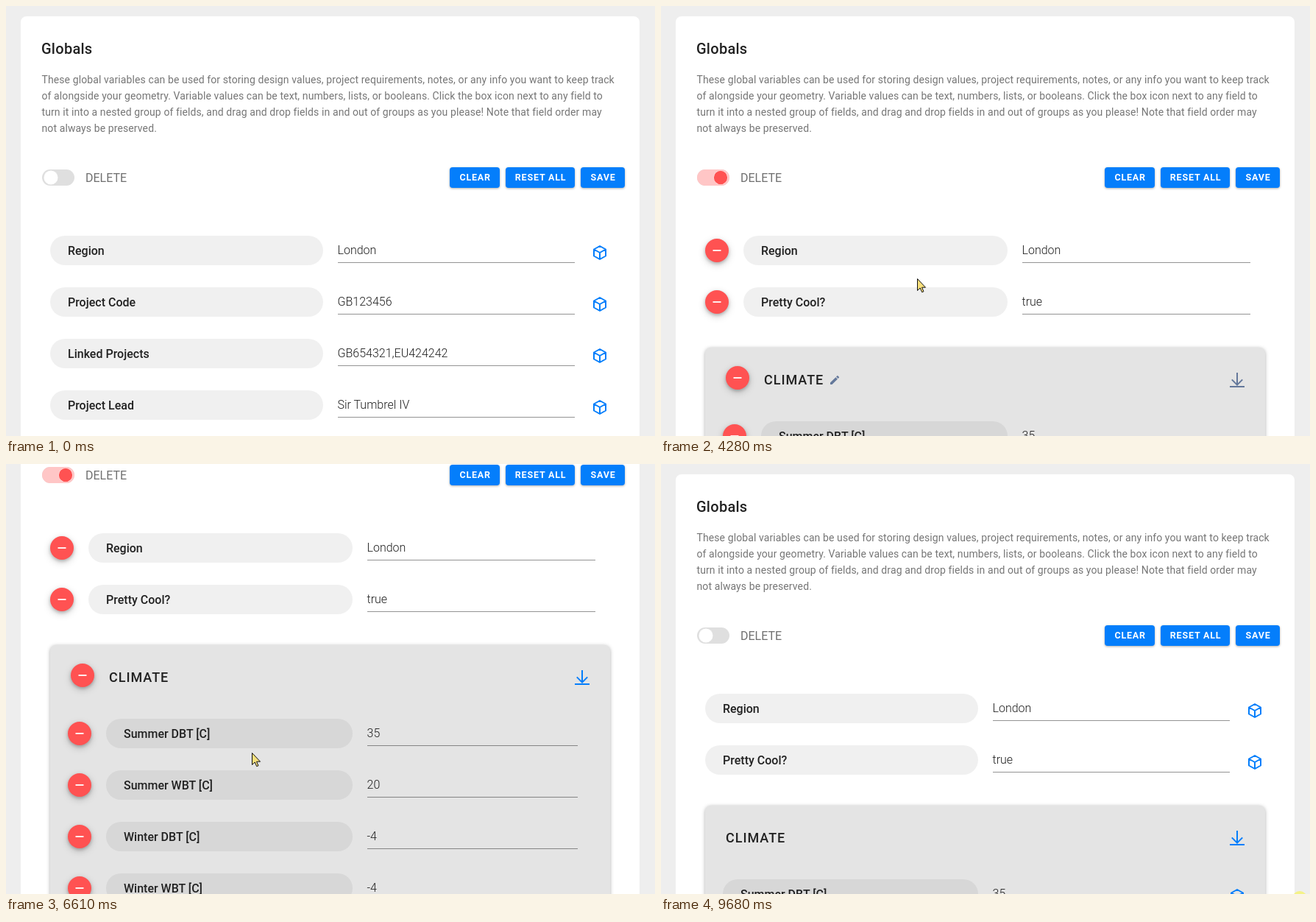
Write an HTML page that moves like this. It is 882 px wide and 584 px high and loops after 9740 ms.

```html
<!DOCTYPE html>
<html lang="en">
<head>
<meta charset="utf-8">
<title>Globals</title>
<style>
html, body { margin: 0; width: 100%; height: 100%; overflow: hidden; background: #eee; }
svg { display: block; width: 100vw; height: 100vh; font-family: Roboto, sans-serif; }
.title { font-size: 20px; font-weight: 500; letter-spacing: .25px; fill: #212121; }
.note { font-size: 14px; letter-spacing: .1px; fill: #767676; }
.switch { font-size: 16px; fill: #707070; }
.btn rect { fill: #047efb; filter: drop-shadow(0 1.5px 1.5px rgba(0,0,0,.32)); }
.btn text { font-size: 12.5px; font-weight: 700; letter-spacing: .8px; fill: #fff; text-anchor: middle; }
.label { font-size: 16px; font-weight: 500; fill: #212121; }
.value { font-size: 16px; font-weight: 300; fill: #212121; }
.group { font-size: 18px; font-weight: 500; letter-spacing: .95px; fill: #212121; }
.panel { filter: drop-shadow(0 1px 2.5px rgba(0,0,0,.32)); }
.minus circle { fill: #ff5252; filter: drop-shadow(0 2px 2px rgba(0,0,0,.2)) drop-shadow(0 3px 5px rgba(0,0,0,.2)); }
.minus path { stroke: #fff; stroke-width: 1.8; }
.cube { fill: none; stroke: #047efb; stroke-width: 2; stroke-linejoin: round; }
.load { fill: none; stroke-width: 2; }
.tip text { font-size: 12px; font-weight: 500; fill: #fff; text-anchor: middle; }
</style>
</head>
<body>
<svg viewBox="0 0 882 584" preserveAspectRatio="none">
  <rect width="882" height="584" fill="#eee"/>
  <g id="page">
    <rect x="20" y="14" width="841" height="1500" rx="8" fill="#fff"/>
    <text class="title" x="48" y="65">Globals</text>
    <g id="note" class="note"></g>
    <rect x="49" y="222" width="44" height="22" rx="11" fill="#dfdfdf"/>
    <rect id="track" x="49" y="222" width="44" height="22" rx="11" fill="#ffc6c6"/>
    <circle id="halo" cy="233" r="17" fill="#000"/>
    <circle id="knob" cy="233" r="9.5" fill="#fff"/>
    <circle id="redKnob" cy="233" r="9.2" fill="#ff5252"/>
    <text class="switch" x="108" y="239">DELETE</text>
    <g id="buttons"></g>
    <g id="fields"></g>
    <g id="tip" class="tip">
      <path d="M102.500 212.500h11l-5.500 5.500z" fill="#777"/>
      <rect x="45" y="190" width="125" height="23" rx="11" fill="#777"/>
      <text x="107.500" y="206">Toggle delete mode</text>
    </g>
  </g>
  <circle id="spot" cx="868" cy="590" r="10" fill="#f5f36e" opacity=".8"/>
  <path id="arrow" d="M.5-.5V15.500L4.200 12 6.700 17.700 9 16.700 6.500 11.200H11.500Z" fill="#f8e07c" stroke="#111"/>
  <g id="beam" fill="none">
    <path d="M-4-8h3l1 1 1-1h3M0-7V7M-4 8h3l1-1 1 1h3" stroke="#111" stroke-width="3"/>
    <path d="M-4-8h3l1 1 1-1h3M0-7V7M-4 8h3l1-1 1 1h3" stroke="#eee"/>
  </g>
</svg>
<script>
const LOOP = 9740;
const $ = id => document.getElementById(id);
const set = (id, attrs) => {
  for (const k in attrs) $(id).setAttribute(k, attrs[k]);
};

const note = [
  'These global variables can be used for storing design values, project requirements, notes, or any info you want to keep track',
  'of alongside your geometry. Variable values can be text, numbers, lists, or booleans. Click the box icon next to any field to',
  'turn it into a nested group of fields, and drag and drop fields in and out of groups as you please! Note that field order may',
  'not always be preserved.'
];
$('note').innerHTML = note.map((s, i) => `<text x="48.500" y="${105 + i * 22}">${s}</text>`).join('');

$('buttons').innerHTML = [['CLEAR', 603, 68], ['RESET ALL', 679, 94], ['SAVE', 781, 60]].map(([s, x, w]) =>
  `<g class="btn"><rect x="${x}" y="219" width="${w}" height="28" rx="4"/><text x="${x + w / 2 + .6}" y="237">${s}</text></g>`).join('');

// name, value, time of removal
const topRows = [
  ['Region', 'London'],
  ['Project Code', 'GB123456', 2250],
  ['Linked Projects', 'GB654321,EU424242', 3810],
  ['Project Lead', 'Sir Tumbrel IV', 2930],
  ['Pretty Cool?', 'true']
];
const climateRows = [['Summer DBT [C]', '35'], ['Summer WBT [C]', '20'], ['Winter DBT [C]', '-4'], ['Winter WBT [C]', '-4']];
const nestedRows = [['Indoor DBT [C]', '21'], ['Indoor RH [%]', '50'], ['Air Change', '2'], ['Occupied', 'true']];

// time, then values
const cursorKeys = [
  [460, 600, 520], [990, 78, 236], [1560, 78, 236], [1680, 82, 253], [1960, 78, 398],
  [2400, 78, 398], [2590, 89, 449], [2660, 89, 449], [2780, 80, 470], [3270, 80, 470],
  [3610, 78, 400], [3860, 78, 400], [4020, 170, 485], [4280, 348, 371], [4690, 348, 371],
  [4830, 345, 372], [6410, 345, 372], [6550, 334, 393], [6940, 334, 393], [7400, 85, 195],
  [8640, 85, 195], [9200, 850, 600]
];
const scrollKeys = [
  [4330, 0], [4690, 300], [5100, 300], [5430, 521], [5600, 521], [5790, 421], [5920, 421],
  [6380, 221], [6550, 221], [6610, 218], [6680, 218], [6860, 121], [6940, 121], [7150, 21],
  [8060, 21], [8130, 0]
];
const greyKeys = [[3810, 0], [3950, 1], [4350, 1], [5030, .6], [5100, .6], [5300, 0]];

const clamp = v => Math.max(0, Math.min(1, v));
const ease = u => .5 - .5 * Math.cos(Math.PI * u);
const ramp = (t, start, len) => ease(clamp((t - start) / len));
const pulse = (t, a, b, len) => ramp(t, a, len) - ramp(t, b, len);

function track(keys, t) {
  const i = keys.findIndex(k => k[0] > t);
  if (i < 0) return keys[keys.length - 1].slice(1);
  if (!i) return keys[0].slice(1);
  const a = keys[i - 1], b = keys[i], u = ease((t - a[0]) / (b[0] - a[0]));
  return a.slice(1).map((v, j) => v + (b[j + 1] - v) * u);
}

const minus = (x, y) =>
  `<g class="minus" transform="translate(${x} ${y})"><circle r="16"/><path d="M-5.500 0h11"/></g>`;

const cube = (x, y) =>
  `<path class="cube" transform="translate(${x} ${y})" d="M0-9 8-4.500V4.500L0 9-8 4.500V-4.500ZM-8-4.500 0 0 8-4.500M0 0V9"/>`;

const inside = (p, x, y, w, h) => p.x >= x && p.x < x + w && p.y >= y && p.y < y + h;

function row([name, value], y, depth, s) {
  const d = depth * 24;
  const x = (s.del ? 112 : 60) + d, end = s.del ? 471 : 431;
  const fx = end + 20, fEnd = (s.del ? 801 : 773) - d;
  const onPill = inside(s.mouse, x, y - 20, end - x, 40);
  const onField = inside(s.mouse, fx, y - 16, fEnd - fx, 33);
  if (onPill || onField) s.typing = true;
  return `<rect x="${x}" y="${y - 20}" width="${end - x}" height="40" rx="20" fill-opacity="${onPill ? .125 : .06}"/>
    <text class="label" x="${x + 24}" y="${y + 6}">${name}</text>
    <text class="value" x="${fx - .5}" y="${y + 5}">${value}</text>
    <rect x="${fx}" y="${y + 16}" width="${fEnd - fx}" height="1" fill-opacity="${onField ? .87 : .42}"/>`
    + (s.del ? minus(76 + d, y) : cube(807 - d, y + 3));
}

function group(name, rows, y, depth, height, fill, s) {
  const d = (depth - 1) * 24, x = (s.del ? 140 : 88) + d;
  return `<rect class="panel" x="${60 + d}" y="${y}" width="${761 - 2 * d}" height="${height}" rx="8" fill="${fill}"/>
    <text class="group" x="${x}" y="${y + 50.4}">${name}</text>
    <path class="load" stroke="${s.ink}" transform="translate(${783 - d} ${y + 44})" d="M0-10V6M-7.200-.600 0 6.600 7.200-.600M-10 9H10"/>`
    + (s.del ? minus(104 + d, y + 41) : '')
    + rows.map((r, i) => row(r, y + 120 + i * 70, depth, s)).join('');
}

const pencil = (y, alpha) =>
  `<path transform="translate(228 ${y}) scale(.67)" fill="#64789a" opacity="${alpha}" d="M20.700 7Q21.400 6.300 20.700 5.600L18.400 3.300Q17.700 2.600 17 3.300L15.100 5.100 18.900 8.900ZM3 17.200V21H6.800L17.800 9.900 14.100 6.200Z"/>`;

let last = '';
function drawFields(s, t) {
  const rows = topRows.filter(r => !(t >= r[2]));
  const top = 332 + rows.length * 70 - 8;
  const alpha = pulse(t, 3830, 4290, 130);
  const html = rows.map((r, i) => row(r, 332 + i * 70, 0, s)).join('')
    + group('CLIMATE', climateRows, top, 1, 860, '#e4e4e4', s)
    + group('COMFORT', nestedRows, top + 392, 2, 420, '#cbcbcb', s)
    + (alpha ? pencil(top + 36, alpha) : '');
  if (html !== last) $('fields').innerHTML = last = html;
}

function draw(t) {
  const [x, y] = track(cursorKeys, t);
  const [scroll] = track(scrollKeys, t);
  const [grey] = track(greyKeys, t);
  const shown = t >= 460 && t < 9220;
  const mix = (a, b) => Math.round(a + (b - a) * grey);
  const s = {
    del: t >= 1300 && t < 7640,
    mouse: shown ? { x, y: y + scroll } : { x: -1, y: -1 },
    ink: `rgb(${mix(4, 100)},${mix(126, 120)},${mix(251, 155)})`,
    typing: false
  };
  drawFields(s, t);

  const on = pulse(t, 1240, 7600, 180), cx = 61 + 20 * on;
  const hover = pulse(t, 980, 1700, 100) + pulse(t, 7340, 8030, 90);
  set('page', { transform: `translate(0 ${-scroll})` });
  set('track', { opacity: on });
  set('halo', { cx, opacity: hover * .045 });
  set('knob', { cx });
  set('redKnob', { cx, opacity: on });
  set('tip', { opacity: hover });
  set('spot', { visibility: t >= 9680 ? 'visible' : 'hidden' });
  const place = `translate(${x} ${y})`;
  set('arrow', { transform: place, visibility: shown && !s.typing ? 'visible' : 'hidden' });
  set('beam', { transform: place, visibility: shown && s.typing ? 'visible' : 'hidden' });
}

function tick() {
  draw(performance.now() % LOOP);
  requestAnimationFrame(tick);
}
tick();
</script>
</body>
</html>
```
